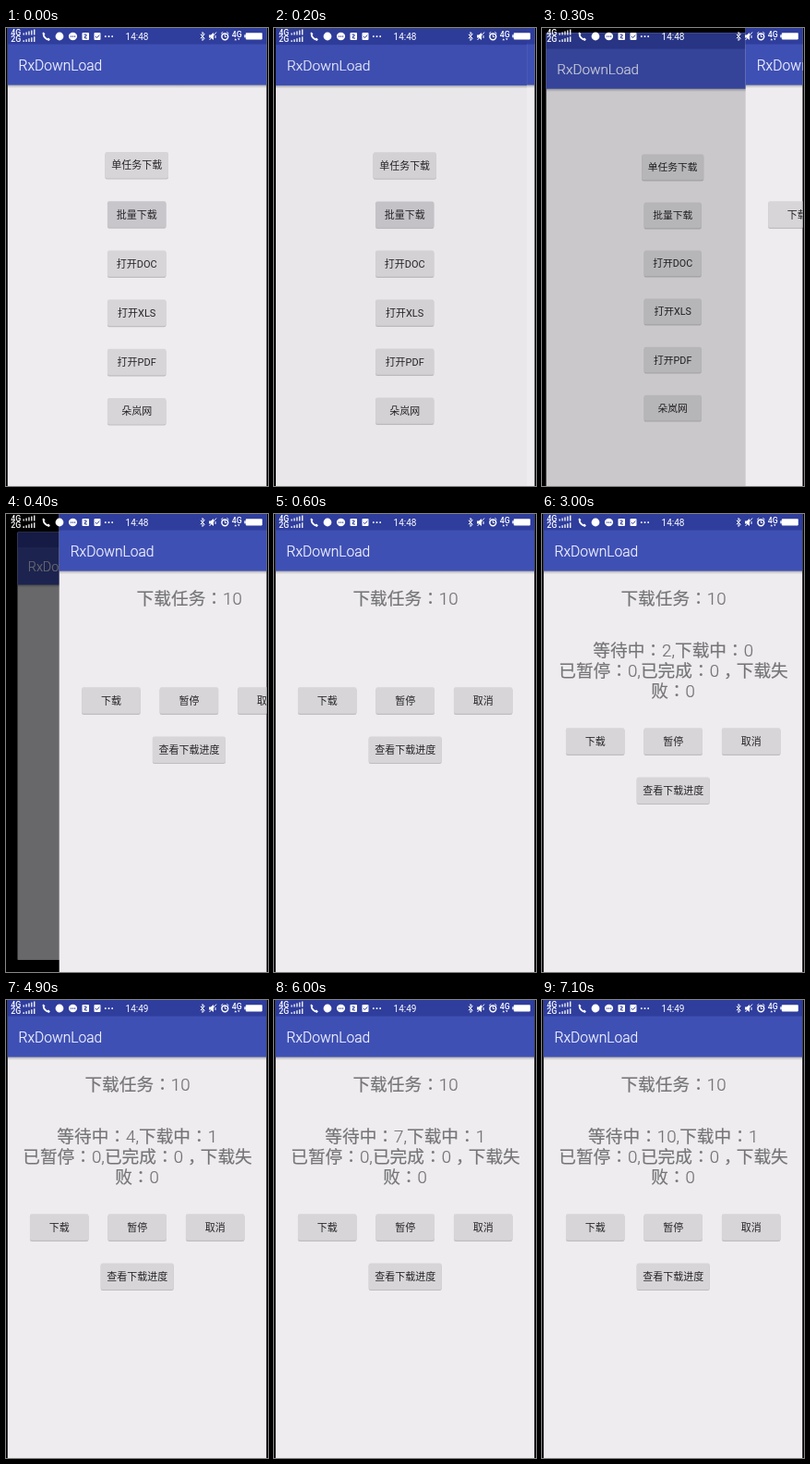
Animation of 284 by 495 pixels, one loop 8000 ms. Source, as an HTML page:

```html
<!DOCTYPE html>
<html lang="zh-CN">
<head>
<meta charset="utf-8">
<title>RxDownLoad</title>
<style>
  html, body { margin: 0; width: 100%; height: 100%; overflow: hidden; background: #000; }
  svg { display: block; width: 284px; height: 495px; }
  text { font-family: Roboto, "Noto Sans CJK SC", sans-serif; white-space: pre; }
  .title { font-size: 15.6px; font-weight: 300; fill: #f4f5ff; stroke: #f4f5ff; stroke-width: .2; }
  .info { font-size: 18.7px; font-weight: 300; fill: #757477; stroke: #757477; stroke-width: .2; text-anchor: middle; }
  .colon { font-family: "Noto Sans CJK JP", "Noto Sans CJK SC", sans-serif; }
  .label { font-size: 11px; fill: #242326; text-anchor: middle; }
  .status text { fill: #fff; }
  .net { font-size: 8.8px; font-weight: 500; }
  .clock { font-size: 10px; text-anchor: middle; }
  .line { fill: none; stroke: #fff; stroke-width: 1; }
</style>
</head>
<body>
<svg viewBox="0 0 284 495">
  <defs>
    <clipPath id="stage"><rect x="1.5" width="281" height="495"/></clipPath>
    <linearGradient id="barShade" x2="0" y2="1">
      <stop stop-color="#000" stop-opacity=".3"/>
      <stop offset="1" stop-color="#000" stop-opacity="0"/>
    </linearGradient>
    <g id="chrome">
      <rect x="1.5" width="281" height="502" fill="#eeecef"/>
      <rect x="1.5" y="61" width="281" height="4" fill="url(#barShade)"/>
      <rect x="1.5" width="281" height="61.6" fill="#3f50b4"/>
      <rect x="1.5" width="281" height="17.5" fill="#2f3d9c"/>
      <text class="title" x="13.5" y="45.5">RxDownLoad</text>
    </g>
  </defs>

  <rect width="284" height="495" fill="#000"/>
  <g clip-path="url(#stage)">
    <g id="home">
      <use href="#chrome"/>
      <g id="menu"></g>
      <rect id="dim" x="1.5" width="281" height="502"/>
    </g>
    <g id="tasks">
      <use href="#chrome"/>
      <text class="info" x="142.5" y="97.7">下载任务<tspan class="colon" lang="ja">：</tspan>10</text>
      <g id="report">
        <text class="info" x="142.2" y="154.3">等待中<tspan class="colon" lang="ja">：</tspan><tspan id="waiting">0</tspan>,下载中<tspan class="colon" lang="ja">：</tspan><tspan id="running">0</tspan></text>
        <text class="info" x="142.5" y="176">已暂停<tspan class="colon" lang="ja">：</tspan>0,已完成<tspan class="colon" lang="ja">：</tspan>0<tspan dx="5">，</tspan><tspan dx="-5">下载失</tspan></text>
        <text class="info" x="142" y="197.7">败<tspan class="colon" lang="ja">：</tspan>0</text>
      </g>
      <g id="actions"></g>
    </g>
  </g>

  <g class="status" fill="#fff">
    <text class="net" x="5.3" y="7.6">4G</text>
    <text class="net" x="5.3" y="15.2">2G</text>
    <path id="signal"/>
    <path class="line" style="stroke-width:1.8" d="M40.5 5.5q0 6 6.5 7.5M40 5.2l1.8 2M45.3 11.2l2 1.8"/>
    <circle cx="58" cy="9" r="4.4"/>
    <ellipse cx="72.5" cy="9" rx="4.6" ry="4.2"/>
    <path d="M70 8.5h1.2v1.2h-1.2zm2 0h1.2v1.2h-1.2zm2 0h1.2v1.2h-1.2z" fill="#2f3d9c"/>
    <rect x="82.5" y="5" width="7.5" height="8" rx="1"/>
    <path d="M84.5 7h2.5v2h-1.5v2h2.5" class="line" style="stroke:#2f3d9c"/>
    <rect x="95.5" y="5" width="7" height="8" rx="1"/>
    <path d="M97 9l1.5 1.6 2.7-3" class="line" style="stroke:#2f3d9c"/>
    <path d="M107 8.3h1.6v1.6H107zm3.7 0h1.6v1.6h-1.6zm3.7 0h1.6v1.6h-1.6z"/>
    <text id="clock" class="clock" x="142" y="12.6">14:48</text>
    <path class="line" d="M210.8 6.8l4.4 4.4-2.2 2.3v-9l2.2 2.3-4.4 4.4"/>
    <path d="M220 7.5h2l3-2.5v8l-3-2.5h-2z"/>
    <path class="line" d="M220.5 13l7.5-8.5M227 8v3"/>
    <circle cx="237.3" cy="9.3" r="3.4" class="line" style="stroke-width:1.5"/>
    <path class="line" d="M237.3 7v2.5h1.8M233.2 6l2-1.7M241.4 6l-2-1.7"/>
    <text class="net" x="244.8" y="10">4G</text>
    <path d="M247.5 13.3l1.3-2 1.3 2zm3.5-2h2.6l-1.3 2z"/>
    <rect x="259.8" y="5.2" width="18" height="7.2" rx=".8"/>
    <rect x="258.3" y="7.3" width="1.5" height="3"/>
  </g>
</svg>
<script>
  const $ = id => document.getElementById(id);

  const button = (label, cx, top, width = 63.5) => `
    <rect x="${cx - width / 2}" y="${top + 1}" width="${width}" height="28.6" rx="2" opacity=".2"/>
    <rect class="face" x="${cx - width / 2}" y="${top}" width="${width}" height="28.4" rx="1.8" fill="#d7d5d8"/>
    <text class="label" x="${cx}" y="${top + 18.3}">${label}</text>`;

  $('menu').innerHTML = ['单任务下载', '批量下载', '打开DOC', '打开XLS', '打开PDF', '朵岚网']
    .map((label, i) => button(label, 141.7, 134 + i * 53.2, i ? 63.5 : 68.5)).join('');
  $('actions').innerHTML = button('下载', 57.7, 187.3) + button('暂停', 142.2, 187.3) +
    button('取消', 226.7, 187.3) + button('查看下载进度', 142.2, 240.5, 79);

  let bars = '';
  for (const base of [7.4, 15])
    for (let i = 0; i < 5; i++) bars += `M${18.5 + i * 2.9} ${base}v${-1.8 - i}h1.3v${1.8 + i}z`;
  $('signal').setAttribute('d', bars);

  const slide = [0, .005, .03, .22, .8, .97, 1];
  const counts = [[0, 0], [2100, 1], [3000, 2], [4000, 3], [4900, 4], [6000, 7], [7000, 10]];
  const batchFace = $('menu').querySelectorAll('.face')[1];
  const setText = (id, value) => {
    if ($(id).textContent !== String(value)) $(id).textContent = value;
  };

  function draw(t) {
    const p = slide[Math.min(6, Math.floor(t / 100))];
    const scale = 1 - .1 * p;
    $('home').setAttribute('transform', `translate(142 248) scale(${scale}) translate(-142 -248)`);
    $('dim').setAttribute('opacity', .7 * p);
    $('tasks').setAttribute('transform', `translate(${281 * (1 - p)} 0)`);
    batchFace.setAttribute('fill', t < 300 ? '#c8c6ca' : '#d7d5d8');

    const reported = t >= 1000;
    $('report').setAttribute('visibility', reported ? 'visible' : 'hidden');
    $('actions').setAttribute('transform', `translate(0 ${reported ? 44 : 0})`);
    setText('waiting', counts.filter(([start]) => t >= start).pop()[1]);
    setText('running', t < 4000 ? 0 : 1);
    setText('clock', t < 4900 ? '14:48' : '14:49');
  }

  const origin = performance.now();
  function tick() {
    draw((performance.now() - origin) % 8000);
    requestAnimationFrame(tick);
  }
  tick();
</script>
</body>
</html>
```
